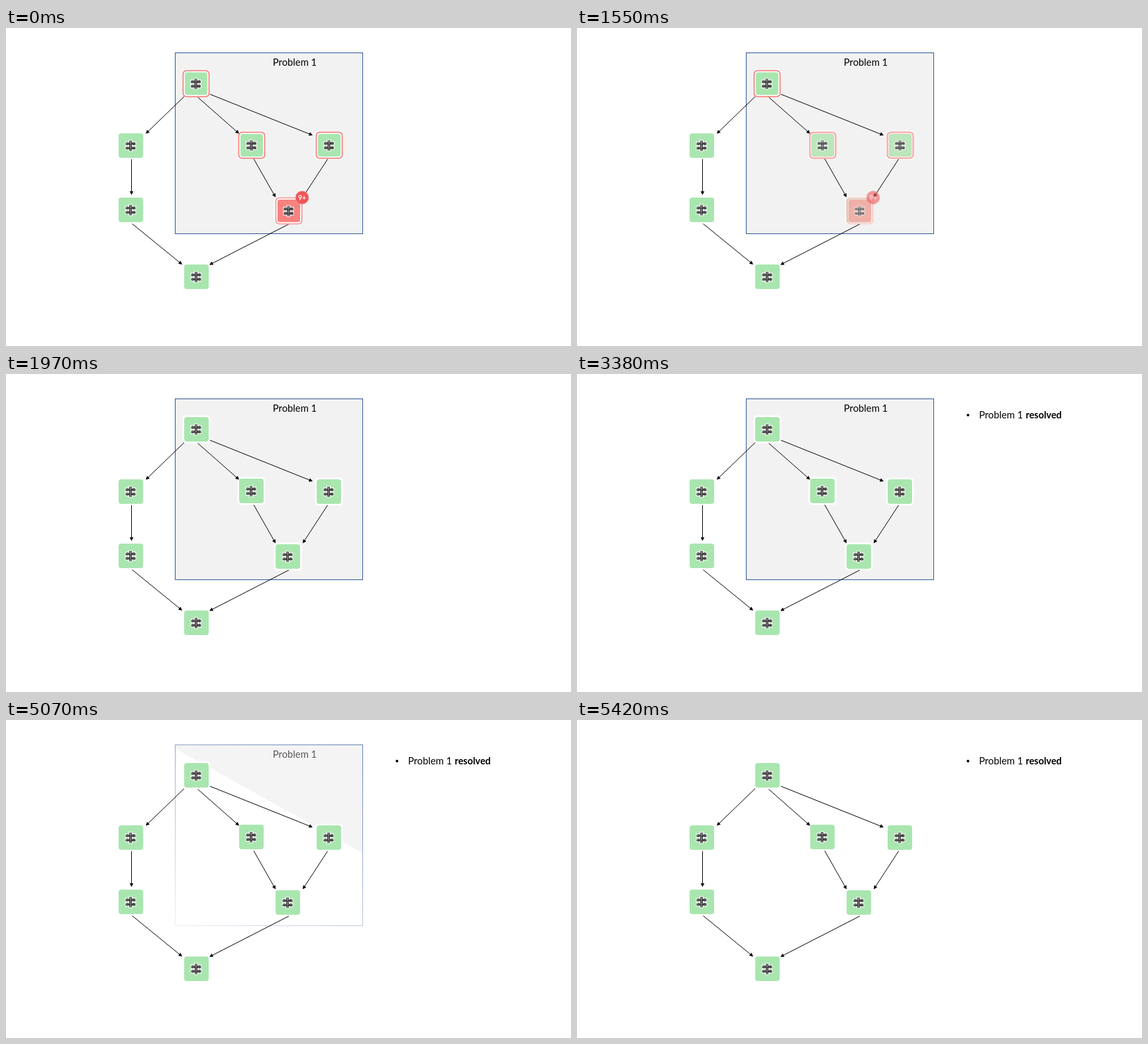
Animation, 853 px wide and 480 px high, one loop 8000 ms. Source, as an HTML page with a canvas:

```html
<!DOCTYPE html>
<html lang="en">
<head>
<meta charset="utf-8">
<title>Problem resolution</title>
<style>
  html, body { margin: 0; width: 100%; height: 100%; overflow: hidden; background: #fff; }
  canvas { display: block; width: 853px; height: 480px; }
</style>
</head>
<body>
<canvas id="stage" width="853" height="480"></canvas>
<script>
const ctx = document.getElementById('stage').getContext('2d');
const LOOP = 8000, STEP = 70;
const GREEN = '#a9e6af', RED = '#f5807f';
const FONT = 'Lato, "Open Sans", sans-serif';
const clamp = v => Math.max(0, Math.min(1, v));

// Centres of the service nodes
const top_ = [287.5, 83.5], left1 = [188.5, 177.5], left2 = [188.5, 274.5];
const middle = [370.5, 176.5], right = [487.5, 177.5];
const failing = [425.5, 275.5], bottom = [287.5, 375.5];
const nodes = [top_, left1, left2, middle, right, failing, bottom];

const arrows = [
  [269, 103.5, 211, 159.5], [289.5, 104.5, 352, 159.5], [308, 100, 463, 162],
  [189.5, 198, 189.5, 252], [374, 197.5, 407, 255.5], [485.5, 198, 448, 255.5],
  [190.5, 295.5, 266, 357], [427, 296, 307, 357.5]
];

function box(cx, cy, size, radius, fill) {
  ctx.beginPath();
  ctx.roundRect(cx - size / 2, cy - size / 2, size, size, radius);
  ctx.fillStyle = fill;
  ctx.fill();
}

function text(str, x, y, size, weight, color, align = 'left') {
  ctx.font = `${weight} ${size}px ${FONT}`;
  ctx.textAlign = align;
  ctx.fillStyle = color;
  ctx.fillText(str, x, y);
}

function pipeIcon(cx, cy) {
  ctx.save();
  ctx.translate(cx - 0.5, cy + 0.3);
  const parts = [
    [-7.5, -5, 15, 3.4], [-7.5, 1.7, 15, 3.4],
    [-6, -5.6, 2.2, 4.6], [4, -5.6, 2.2, 4.6],
    [-6, 1.1, 2.2, 4.6], [4, 1.1, 2.2, 4.6],
    [-2, -8, 4, 16]
  ];
  ctx.fillStyle = 'rgba(255,255,255,.9)';
  for (const [x, y, w, h] of parts) ctx.fillRect(x - 1, y - 1, w + 2, h + 2);
  const metal = ctx.createLinearGradient(-8, 0, 8, 0);
  metal.addColorStop(0, '#777');
  metal.addColorStop(0.35, '#555');
  metal.addColorStop(0.5, '#858585');
  metal.addColorStop(0.65, '#444');
  metal.addColorStop(1, '#666');
  ctx.fillStyle = metal;
  for (const part of parts) ctx.fillRect(...part);
  ctx.fillStyle = '#3b3b3b';
  ctx.fillRect(-2, -5, 1.1, 10.5);
  ctx.fillRect(1.1, -5, 0.9, 10.5);
  ctx.fillRect(-7.5, -2.6, 15, 1);
  ctx.fillRect(-7.5, 4.1, 15, 1);
  ctx.restore();
}

function arrow(x1, y1, x2, y2) {
  const angle = Math.atan2(y2 - y1, x2 - x1);
  ctx.strokeStyle = ctx.fillStyle = '#000';
  ctx.lineWidth = 1;
  ctx.beginPath();
  ctx.moveTo(x1, y1);
  ctx.lineTo(x2 - 3 * Math.cos(angle), y2 - 3 * Math.sin(angle));
  ctx.stroke();
  ctx.save();
  ctx.translate(x2, y2);
  ctx.rotate(angle);
  ctx.beginPath();
  ctx.moveTo(0, 0);
  ctx.lineTo(-5.5, -2.8);
  ctx.lineTo(-5.5, 2.8);
  ctx.fill();
  ctx.restore();
}

function alertNode(cx, cy, fill, ring, alpha) {
  if (alpha <= 0) return;
  ctx.globalAlpha = alpha;
  box(cx, cy, 41, 6, ring);
  box(cx, cy, 37.4, 4.5, '#fff');
  box(cx, cy, 34, 3.5, fill);
  pipeIcon(cx, cy);
  ctx.globalAlpha = 1;
}

function badge(cx, cy, alpha) {
  if (alpha <= 0) return;
  ctx.globalAlpha = alpha;
  ctx.beginPath();
  ctx.arc(cx, cy, 10, 0, Math.PI * 2);
  ctx.fillStyle = '#ef5657';
  ctx.fill();
  ctx.lineWidth = 0.8;
  ctx.strokeStyle = '#f7a3a3';
  ctx.stroke();
  text('9+', cx, cy + 3.6, 10.5, 'bold', '#fff', 'center');
  ctx.globalAlpha = 1;
}

// The problem area dissolves from its bottom left to its top right corner.
function problemArea(progress) {
  if (progress >= 1) return;
  const span = 1.58, edge = 0.98, slope = 0.42;
  const shift = 1 - 2 * progress;
  const alphaAt = s => progress ? clamp(0.5 + slope * (s - edge) + shift) : 1;
  const diagonal = () => ctx.createLinearGradient(255, 311, 439, -19);

  const cut = clamp((edge - shift / slope) / span);
  const fill = diagonal();
  fill.addColorStop(cut, '#fff');
  fill.addColorStop(cut, progress < 0.3 ? '#f2f2f2' : '#f4f4f4');
  if (cut < 1) {
    ctx.fillStyle = fill;
    ctx.fillRect(255, 37, 284, 274);
  }

  const border = diagonal();
  for (let i = 0; i <= 10; i++)
    border.addColorStop(i / 10, `rgba(47,85,151,${alphaAt(span * i / 10)})`);
  ctx.strokeStyle = border;
  ctx.lineWidth = 1;
  ctx.strokeRect(255.5, 37.5, 283, 273);

  text('Problem 1', 436, 57, 14.8, 'normal', `rgba(0,0,0,${alphaAt(1.31)})`, 'center');
}

function draw(t) {
  ctx.fillStyle = '#fff';
  ctx.fillRect(0, 0, 853, 480);

  const dissolveStep = Math.floor((t - 4790) / STEP) + 1;
  problemArea(clamp(dissolveStep / 10));

  for (const [x, y] of nodes) {
    box(x, y, 42, 5, '#fff');
    box(x, y, 37, 4, GREEN);
    pipeIcon(x, y);
  }
  for (const a of arrows) arrow(...a);

  // Alerts clear one after another, each over six steps
  const step = Math.floor((t - 1410) / STEP);
  const remaining = start => step < 0 ? 1 : clamp(1 - (step - start) / 6);
  alertNode(287, 84, GREEN, RED, remaining(2));
  alertNode(371, 177, GREEN, RED, remaining(0.5));
  alertNode(488, 177, GREEN, RED, remaining(0.5));
  alertNode(427, 276, '#f7827f', '#f59a98', remaining(-1));
  badge(447, 256, remaining(-0.4));

  if (t >= 3380) {
    ctx.fillStyle = '#000';
    ctx.beginPath();
    ctx.arc(590.3, 62, 2, 0, Math.PI * 2);
    ctx.fill();
    text('Problem 1', 607, 67, 14.8, 'normal', '#000');
    text('resolved', 677.5, 67, 14.4, 'bold', '#000');
  }
}

const start = performance.now();
function tick() {
  draw((performance.now() - start) % LOOP);
  requestAnimationFrame(tick);
}
tick();
</script>
</body>
</html>
```
